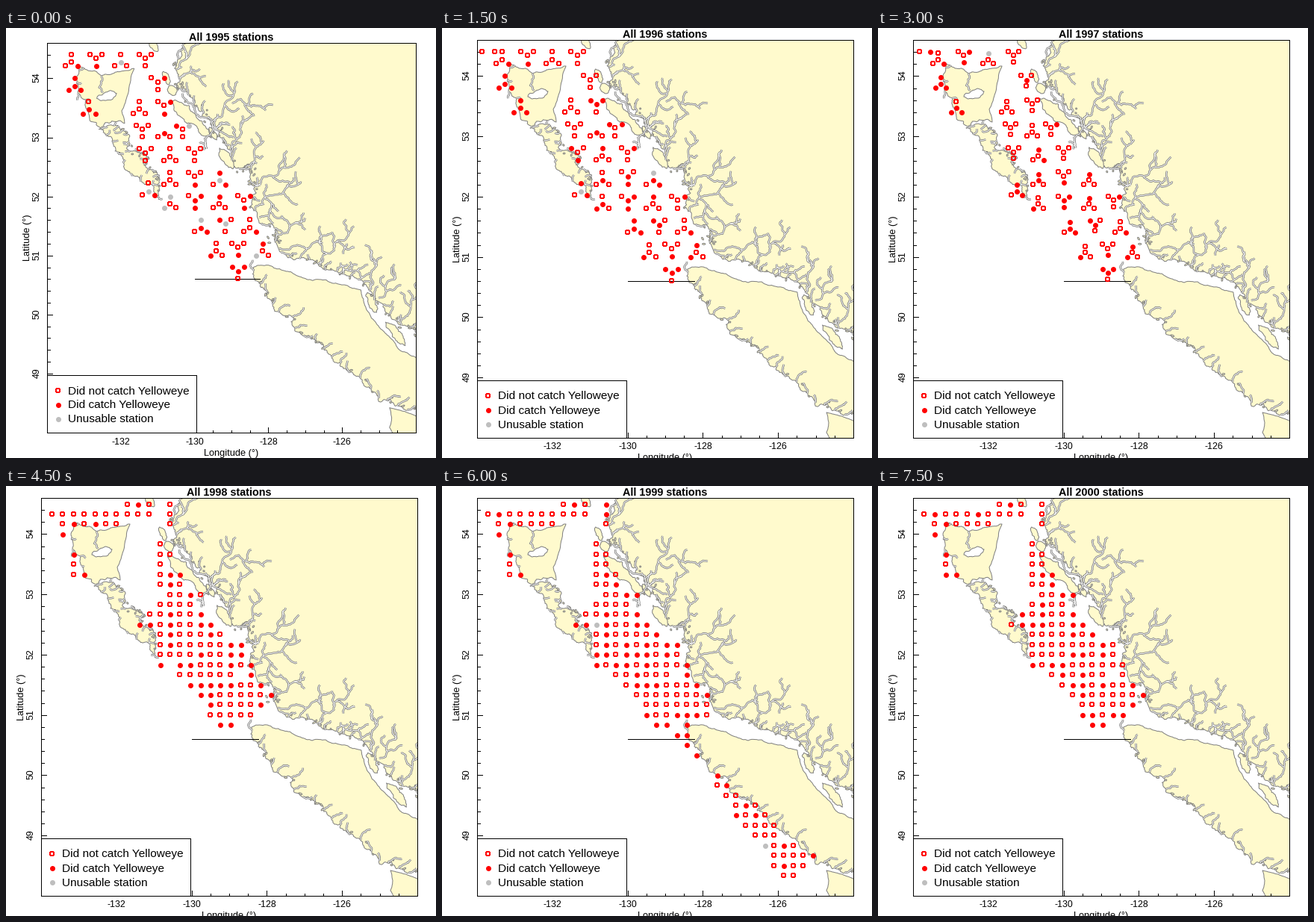
Recreate the animation shown at these times as a matplotlib script. Size 576 px wide and 576 px high, loop 8000 ms.

```python
import numpy as np
import matplotlib.pyplot as plt
from matplotlib.animation import FuncAnimation
from matplotlib.collections import LineCollection, PolyCollection
from matplotlib.patches import Rectangle

plt.rcParams["font.family"] = "Liberation Sans"
LAND, COAST = "#FFFACD", "#7F7F7F"
RED, GREY = "#FF0000", "#BEBEBE"
WIDE = (47, 15, 551, 548)      # left, top, right, bottom of the map box
NARROW = (55, 19, 549, 541)
rng = np.random.default_rng(12)


def fit(pts, box):
    """Place points of the wide map in another map box."""
    a, b = np.array(WIDE[:2]), np.array(WIDE[2:])
    c, d = np.array(box[:2]), np.array(box[2:])
    return c + (np.asarray(pts, float) - a) * (d - c) / (b - a)


# --- coastline -------------------------------------------------------------
def rough(pts, amp=0.3, step=2.5):
    """Make a line jagged by midpoint displacement."""
    pts = np.array(pts, float)
    while True:
        seg = np.diff(pts, axis=0)
        long = np.hypot(*seg.T) > step
        if not long.any():
            return pts
        side = np.column_stack([-seg[:, 1], seg[:, 0]])
        mid = pts[:-1] + seg / 2 + side * rng.uniform(-amp, amp, (len(seg), 1))
        out = [pts[0]]
        for m, p, split in zip(mid, pts[1:], long):
            out += [m, p] if split else [p]
        pts = np.array(out)


def sliver(x, y, angle, length, width):
    """A rough lens-shaped island."""
    t = np.linspace(0, 2 * np.pi, 9)
    u, v = length / 2 * np.cos(t), width / 2 * np.sin(t)
    c, s = np.cos(np.radians(angle)), np.sin(np.radians(angle))
    return rough(np.column_stack([x + u * c - v * s, y + u * s + v * c]), 0.2)


def fjord(x, y, heading, length):
    """A winding inlet with side arms, as a list of lines."""
    n = max(3, int(length / 4))
    sway = 35 * np.sin(np.arange(n) * 0.9 + rng.uniform(0, 6))
    a = np.radians(heading + sway + rng.normal(0, 14, n))
    step = length / n * 1.1
    path = np.cumsum(np.vstack([[x, y], step * np.column_stack(
        [np.cos(a), np.sin(a)])]), axis=0)
    arms = [rough(path, 0.25)]
    if length > 25:
        for side in (-65, 60, -40):
            px, py = path[rng.integers(n // 3, n)]
            arms += fjord(px, py, heading + side, length * rng.uniform(0.2, 0.4))
    return arms


def fringe(path, heading, count, reach):
    """Short inlets spread along a coast."""
    lines = []
    for i in np.linspace(2, len(path) - 3, count).astype(int):
        lines += fjord(*path[i], heading + rng.normal(0, 30),
                       reach * rng.uniform(0.4, 1.2))
    return lines


def skerries(path, count, spread):
    spots = path[rng.integers(0, len(path), count)]
    spots = spots + rng.normal(0, spread, spots.shape)
    return [sliver(x, y, rng.uniform(0, 180), rng.uniform(2, 6), 2)
            for x, y in spots]


outer = rough([(229, 15), (225, 40), (227, 58), (224, 76), (248, 100),
               (270, 121), (291, 153), (311, 187), (326, 186), (333, 220),
               (345, 264), (357, 268), (360, 288)])
strait = rough([(364, 298), (392, 310), (418, 319), (446, 330), (484, 348),
                (506, 372), (524, 395), (544, 403), (556, 420)], 0.2)
inner = rough([(329, 322), (350, 319), (380, 328), (410, 340), (446, 345),
               (476, 353), (483, 378), (500, 402), (530, 436), (556, 448)], 0.1)
ocean = rough([(556, 518), (520, 507), (490, 488), (468, 470), (438, 448),
               (408, 420), (384, 391), (355, 372), (344, 352), (331, 340),
               (329, 322)], 0.28)
graham = np.vstack([
    rough([(92, 47), (112, 53), (121, 60), (140, 55), (166, 50)], 0.14),
    rough([(166, 50), (159, 76), (149, 108), (153, 125)], 0.05),
    rough([(153, 125), (120, 131), (100, 104), (89, 84), (92, 47)], 0.22)])
east = rough([(142, 128), (157, 140), (172, 164), (186, 188), (200, 212),
              (200, 229)], 0.35)
west = rough([(200, 229), (170, 197), (140, 163), (118, 133), (142, 128)], 0.25)
olympic = rough([(515, 514), (556, 526), (556, 556), (523, 553), (515, 541),
                 (518, 528), (515, 514)], 0.06)
lands = [np.vstack([outer, strait, [(556, 10), (229, 10)]]),
         np.vstack([inner, ocean]), graham, np.vstack([east, west]), olympic,
         sliver(244, 119, 43, 76, 17), sliver(292, 173, 57, 34, 12),
         sliver(191, 17, 55, 24, 9), sliver(210, 63, 65, 20, 8),
         sliver(218, 80, 50, 15, 12), sliver(274, 139, 60, 20, 6),
         sliver(491, 370, 65, 30, 11), sliver(523, 413, 50, 42, 11)]
lands += skerries(east, 20, 2.5) + skerries(outer, 45, 4)
lands += skerries(strait, 24, 3) + skerries(ocean, 20, 2)

# mouth of each long inlet, its heading in degrees and its length
INLETS = [(227, 50, -50, 48), (226, 62, -8, 38), (232, 84, 48, 75),
          (276, 132, -58, 72), (300, 98, 12, 50), (300, 165, -62, 52),
          (318, 186, -68, 45), (334, 212, -32, 72), (340, 236, -28, 62),
          (346, 208, 80, 58), (360, 280, -38, 48), (364, 296, -10, 62),
          (420, 319, -48, 72), (446, 330, -8, 42), (488, 350, -82, 56),
          (500, 364, -62, 56), (530, 396, -68, 62)]
water = [arm for inlet in INLETS for arm in fjord(*inlet)]
water += fringe(outer, -35, 22, 17) + fringe(strait, -50, 20, 16)
water += fringe(ocean, -45, 20, 17) + fringe(west, -20, 10, 8)
water += fringe(east, 160, 14, 10) + fringe(graham[-40:], 0, 5, 8)
water += fjord(121, 60, 75, 24)
lake = sliver(128, 87, -15, 28, 11)

# --- stations: o no catch, x catch, u unusable, - none ----------------------
# Y-shaped groups (row, column, one word per year): both arms, fork, foot
GROUPS = [
    (0, -2.2, "---- oo-- ox--"), (0, 4, "ooox ooox oxox"),
    (0, 12, "oooo oooo oooo"), (1, 0, "oxoo oxoo oxoo"),
    (1, 8, "oouo oooo ooou"), (2, 14, "oxoo oooo ooxo"),
    (3, 0.4, "xxxx xxxx xxxx"), (4, 15, "oxox xxxo oooo"),
    (5, 2.8, "xxxo xxxx xxxo"), (5, 11, "oooo oooo oooo"),
    (6, 11.5, "oooo oooo oooo"), (6, 18, "xuoo xxoo oxoo"),
    (7, 15, "oox- oox- oooo"), (8, 12, "oooo xoox oooo"),
    (8, 20, "oooo oxoo oooo"), (9, 16, "oooo ooox oxox"),
    (10, 20, "ooox ooxx ooox"), (11, 16, "oooo ooxo ooxx"),
    (11, 24, "oxux oxxu ooox"), (11.9, 12.5, "oxuo oxux oxxx"),
    (12, 20, "oxxx oxxx oxxx"), (12, 28, "oxox oxoo oxoo"),
    (13, 16, "uoou xoxo xooo"), (13, 24, "ooox ooox ooox"),
    (14, 25, "xouo xoxo xoxo"), (15, 21, "oxxu oxxx oxxx"),
    (15, 29, "oxoo oxoo oxoo"), (16, 27, "ooox ooox ooox"),
    (17, 23.5, "xooo xooo xooo"), (17, 31, "uoox xoox xoox"),
    (18, 27, "xxxo xxxo xxxo")]
# straight rows of the later years: row, first column, one word per year
NORTH = [
    (0, 7, "oxo-o oxo-x oxo-o"),
    (1, 0, "oooooooooo-o oxoooooooo-x oxoooxoooo-o"),
    (2, 1, "oxoxoo----o oxoooo----o oxoooo----o"), (3, 1, "x x x"),
    (5, 2, "x x x"), (6, 2, "o o o"), (7, 2, "ox ox xx")]
SOUTH = [
    (4, 2, "o o o"), (5, 2, "oo oo oo"), (6, 2, "o oo oo"),
    (7, 2, "oxx oxo oxx"), (8, 2, "oxo oox oox"), (9, 3, "ooxo ooxx ooxx"),
    (10, 2, "oooo oooo oxoo"), (11, 1, "ooxoox ooxoox xoxoox"),
    (12, 0, "xxoxooxx xxuxooxx oxxxooxx"), (13, 2, "oxoooxo oxoooox ooooxox"),
    (14, 2, "oxoooooxx oxoxoxoxx oooooooxo"),
    (15, 2, "ooooxooxx xxoxxxoxo ooooxxoxo"),
    (16, 2, "x-xxoooxox xoxxoxooox xoxxoooooo"),
    (17, 4, "oooooo-x ooxooo-x oxoxoo-o"),
    (18, 5, "xxxxxoox oxxxooox oxxoxoox"),
    (19, 6, "xxooooox ooooooox oxooooox"), (20, 7, "xoooox ooooooo ooooox"),
    (21, 7, "ooooo xooxxxo xxoxx"), (22, 8, "xx xx-x xx"),
    (23, 10, "- xx -"), (24, 11, "- x -"), (25, 12, "- x -"),
    (27, 14, "- x -"), (28, 14, "- ox -"), (29, 15, "- oo -"),
    (30, 16, "- oxo -"), (31, 16, "- xoxo -"), (32, 17, "- oooo -"),
    (33, 18, "- ooo -"), (34, 19, "- uoxo -"), (35, 20, "- oooox -"),
    (36, 20, "- oxoo -"), (37, 21, "- oo -")]


def grouped(year):
    arm, foot = (7, 14) if year == 2 else (8.3, 16)
    for row, col, words in GROUPS:
        x, y = 80 + 8.4 * col, 31 + 16.15 * row
        way = -1 if int(row) % 2 else 1
        spots = ((x - arm, y), (x + arm, y), (x, y + 5.5 * way),
                 (x, y + foot * way))
        yield from zip(words.split()[year], spots)


def gridded(year):
    for rows, south in ((NORTH, False), (SOUTH, True)):
        for row, first, words in rows:
            for i, mark in enumerate(words.split()[year]):
                k = first + i
                x = 61 + 14.4 * k
                if south:
                    x = 178.5 + 13.5 * min(k, 14) + 12.8 * max(k - 14, 0)
                yield mark, (x, 23.5 + 13.45 * row)


def stations(year):
    marks = list(grouped(year) if year < 3 else gridded(year - 3))
    return {kind: [p for m, p in marks if m == kind] for kind in "oxu"}


YEARS = [stations(y) for y in range(6)]

# --- drawing ---------------------------------------------------------------
fig = plt.figure(figsize=(8, 8), dpi=72, facecolor="white")
ax = fig.add_axes([0, 0, 1, 1])


def dots(pts, kind, z):
    if not len(pts):
        return
    x, y = np.round(pts).T
    style = {"o": dict(s=36, facecolors="none", edgecolors=RED, linewidths=1),
             "x": dict(s=49, facecolors=RED, linewidths=0),
             "u": dict(s=49, facecolors=GREY, linewidths=0)}[kind]
    ax.scatter(x + 0.5, y - 0.5, zorder=z, antialiased=False, **style)


def line(xs, ys):
    ax.plot(xs, ys, color="black", lw=1, aa=False, zorder=4,
            solid_capstyle="butt")


def label(x, y, s, size, **kw):
    ax.text(x, y, s, size=size, **{"ha": "center", "va": "center", **kw})


def draw_map(box, border):
    paths = [fit(w, box) for w in water]
    for layer in (
            PolyCollection([fit(p, box) for p in lands], facecolors=LAND,
                           edgecolors=COAST, linewidths=1, zorder=1),
            LineCollection(paths, colors=COAST, linewidths=2.6, zorder=2),
            PolyCollection([fit(lake, box)], facecolors="white",
                           edgecolors=COAST, linewidths=1, zorder=2.5),
            LineCollection(paths, colors="white", linewidths=0.9, zorder=3)):
        ax.add_collection(layer, autolim=False)
        layer.set_clip_path(border)


def draw_axes(box, year):
    left, top, right, bottom = box
    sx, sy = (right - left) / 10, (bottom - top) / 6.6
    for i in range(1, 20):
        x, major = left + sx * i / 2, i % 4 == 0
        line([x, x], [bottom, bottom - (7 if major else 3.5)])
        if major:
            label(x, bottom + 12.5, str(-134 + i // 2), 12.4)
    for i in range(1, 33):
        y, major = bottom - sy * i / 5, i % 5 == 0
        line([left, left + (7 if major else 3.5)], [y, y])
        if major:
            label(left - 13.5, y - 1, str(48 + i // 5), 12.4, rotation=90)
    cx, cy = (left + right) / 2, (top + bottom) / 2
    label(cx, bottom + 27.5, "Longitude (°)", 12.7)
    label(left - 26, cy, "Latitude (°)", 12.7, rotation=90)
    label(cx, top - 3, f"All {year} stations", 14.4, weight="bold",
          va="baseline")


def draw_legend(left, bottom):
    ax.add_patch(Rectangle((left, bottom - 77), 200, 77, fc="white",
                           ec="black", lw=1, aa=False, zorder=7))
    rows = ("Did not catch Yelloweye", "Did catch Yelloweye",
            "Unusable station")
    for i, (kind, name) in enumerate(zip("oxu", rows)):
        y = bottom - 56 + 19 * i
        dots([(left + 14, y)], kind, 8)
        label(left + 28, y + 4.5, name, 15.4, ha="left", va="baseline", zorder=8)


def draw(frame):
    year = frame // 3
    box = WIDE if year else NARROW
    left, top, right, bottom = box
    ax.clear()
    ax.set(xlim=(0, 576), ylim=(575, -1))
    ax.axis("off")
    border = Rectangle((left, top), right - left, bottom - top, fc="none",
                       ec="black", lw=1, aa=False, zorder=5)
    ax.add_patch(border)
    draw_map(box, border)
    line(*fit([(249, 338), (338, 338)], box).T)
    for z, (kind, pts) in enumerate(YEARS[year].items()):
        if pts:
            dots(fit(pts, box), kind, 6 + z / 10)
    draw_axes(box, 1995 + year)
    draw_legend(left, bottom)
    return []


anim = FuncAnimation(fig, draw, frames=16, interval=500, repeat=True,
                     repeat_delay=0, init_func=lambda: [])
plt.show()
```
